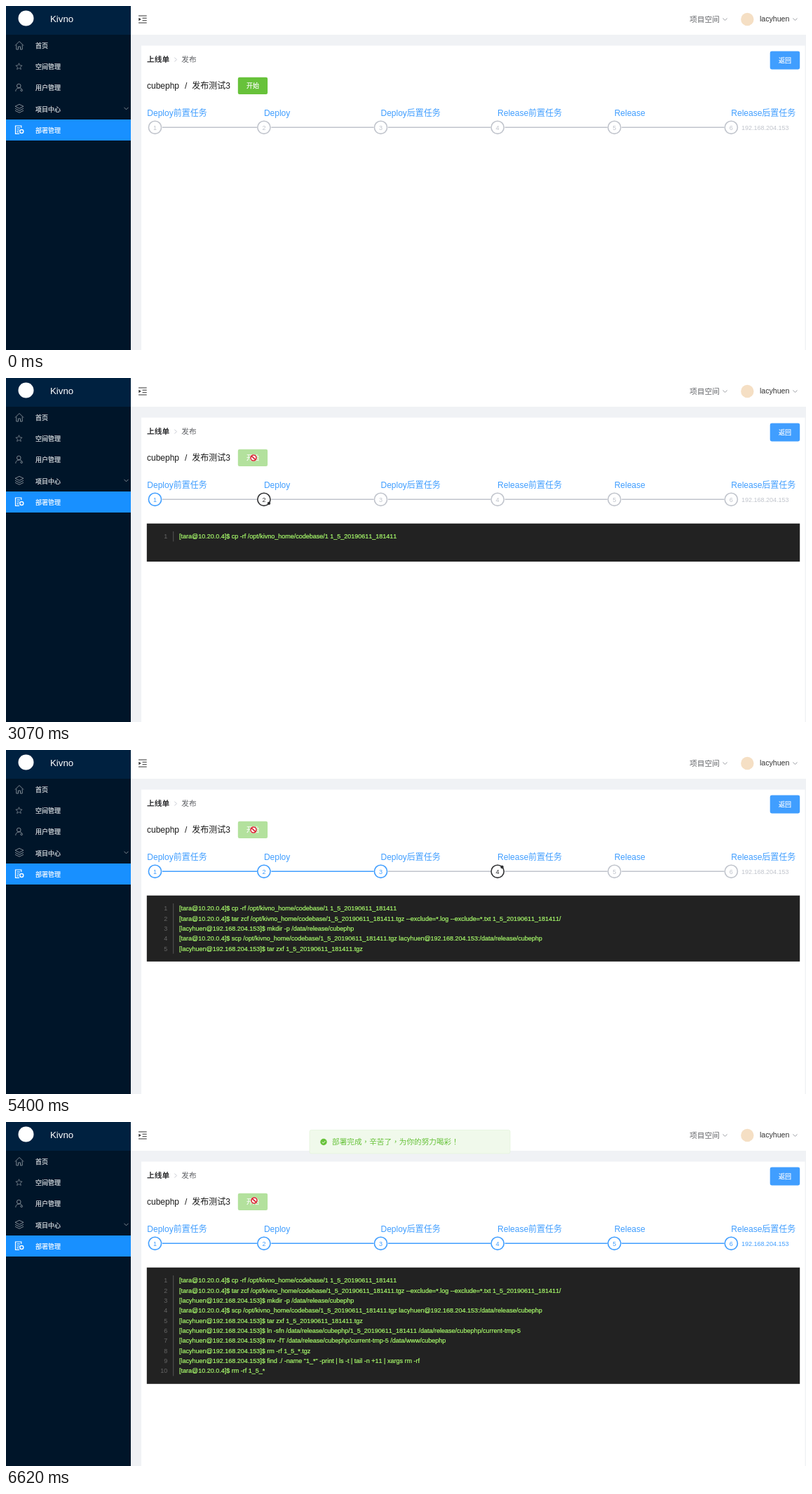
Animation, 1141 px wide and 491 px high, one loop 6.69 s. Source, as an HTML page:

```html
<!DOCTYPE html>
<html lang="zh-CN">
<head>
<meta charset="utf-8">
<title>部署</title>
<style>
html, body { margin: 0; width: 100%; height: 100%; overflow: hidden; background: #f0f2f5; }
svg { display: block; width: 1141px; height: 491px; }
text { font-family: "Liberation Sans", "Noto Sans CJK SC", "Noto Sans CJK", sans-serif; font-kerning: none; white-space: pre; }
.wide { font-family: "Noto Sans CJK TC", "Noto Sans CJK", sans-serif; }
</style>
</head>
<body>
<svg id="stage" viewBox="0 0 1141 491"></svg>
<script>
const LOOP = 6690, TICK = 77;
const BLUE = '#409eff', GRAY = '#c0c4cc', DARK = '#303133', GREEN = '#67c23a', LIME = '#aaff6c';
const USER = 'lacyhuen', HOST = '192.168.204.153';
const LOCAL = '[tara@10.20.0.4]$ ', REMOTE = `[${USER}@${HOST}]$ `;
const HOME = '/opt/kivno_home/codebase/1', BUILD = '1_5_20190611_181411';
const LINE = 14.35;

const commands = [
  `${LOCAL}cp -rf ${HOME} ${BUILD}`,
  `${LOCAL}tar zcf /opt/kivno_home/codebase/${BUILD}.tgz --exclude=*.log --exclude=*.txt ${BUILD}/`,
  `${REMOTE}mkdir -p /data/release/cubephp`,
  `${LOCAL}scp /opt/kivno_home/codebase/${BUILD}.tgz ${USER}@${HOST}:/data/release/cubephp`,
  `${REMOTE}tar zxf ${BUILD}.tgz`,
  `${REMOTE}ln -sfn /data/release/cubephp/${BUILD} /data/release/cubephp/current-tmp-5`,
  `${REMOTE}mv -fT /data/release/cubephp/current-tmp-5 /data/www/cubephp`,
  `${REMOTE}rm -rf 1_5_*.tgz`,
  `${REMOTE}find ./ -name "1_*" -print | ls -t | tail -n +11 | xargs rm -rf`,
  `${LOCAL}rm -rf 1_5_*`
];
const steps = ['Deploy前置任务', 'Deploy', 'Deploy后置任务', 'Release前置任务', 'Release', 'Release后置任务'];

// time, active step, visible lines
const progress = [
  [0, -1, 0], [3070, 1, 1], [3780, 2, 2], [5090, 3, 3], [5170, 3, 4],
  [5400, 3, 5], [5470, 4, 7], [5550, 5, 8], [5630, 5, 9], [5700, 6, 10]
];

const rect = (x, y, w, h, fill, more = '') =>
  `<rect x="${x}" y="${y}" width="${w}" height="${h}" fill="${fill}" ${more}/>`;
const circle = (x, y, r, more) => `<circle cx="${x}" cy="${y}" r="${r}" ${more}/>`;
const path = (d, color, width = 1, more = '') =>
  `<path d="${d}" fill="none" stroke="${color}" stroke-width="${width}" ${more}/>`;
const label = (x, y, size, fill, str, more = '') =>
  `<text x="${x}" y="${y}" font-size="${size}" fill="${fill}" ${more}>${str}</text>`;
const chevron = (x, y, color) => path(`M${x - 3} ${y - 1.5}l3 3l3 -3`, color, 0.9);
const heavier = color => `stroke="${color}" stroke-width=".2"`;
const mid = 'text-anchor="middle"';

function starPath(x, y, r) {
  let d = '';
  for (let i = 0; i < 10; i++) {
    const a = -Math.PI / 2 + i * Math.PI / 5, q = i % 2 ? r * 0.45 : r;
    d += `${i ? 'L' : 'M'}${(x + q * Math.cos(a)).toFixed(2)} ${(y + q * Math.sin(a)).toFixed(2)}`;
  }
  return d + 'Z';
}

function sidebar() {
  const ink = '#8e979f';
  const names = ['首页', '空间管理', '用户管理', '项目中心', '部署管理'];
  return rect(0, 0, 178, 491, '#001529') + rect(0, 0, 178, 41, '#002140') +
    rect(0, 162, 178, 30, '#1890ff') +
    circle(28.5, 17.5, 11, 'fill="#fff"') +
    label(63, 23.2, 13.3, '#fff', 'Kivno') +
    names.map((s, i) => {
      const color = i === 4 ? '#fff' : '#e4e7ea';
      return label(42, 60.2 + i * 30.1, 9, color, s, heavier(color));
    }).join('') +
    path('M13 56.5L19 50.5L25 56.5M14.8 55.5V62H17.5V58H20.5V62H23.2V55.5', ink, 0.9) +
    path(starPath(18.5, 86.5, 4.8), ink, 0.7) +
    path('M13.8 121.8C13.8 116 22 116 22.5 118.5', ink, 0.9) +
    circle(18.3, 114, 2.8, `fill="none" stroke="${ink}" stroke-width=".9"`) +
    circle(22.2, 120.3, 1.3, `fill="none" stroke="${ink}" stroke-width=".9"`) +
    path('M13 143.3L19 140.3L25 143.3L19 146.3ZM13 146.3L19 149.3L25 146.3M13 149.2L19 152.2L25 149.2', ink, 0.9) +
    chevron(171.5, 146.3, ink) +
    path('M21.8 174V171H13.5V182.3H19M15.5 174H20M15.5 177H19M15.5 179.7H18', '#fff', 1.2) +
    circle(22.3, 179, 2.5, 'fill="none" stroke="#fff" stroke-width="1.4"');
}

function header() {
  return rect(178, 0, 963, 41, '#fff') +
    path('M189 14H200.7M194.5 17.3H200.7M194.5 20.7H200.7M189 24H200.7', '#333') +
    '<path d="M189.3 16.7L192.8 19L189.3 21.3Z" fill="#333"/>' +
    label(975, 22.7, 10.7, '#606266', '项目空间') + chevron(1025.5, 19, '#909399') +
    circle(1057.3, 19, 9.2, 'fill="#f5dfc4"') +
    label(1075, 22.4, 10.6, '#333', USER) + chevron(1125.5, 19, '#909399');
}

function content() {
  return rect(193, 56.5, 946.5, 434.5, '#fff') +
    label(201, 80.4, 10.7, DARK, '上线单', 'font-weight="700"') +
    path('M240.3 73.5L243.3 76.5L240.3 79.5', GRAY, 0.9) +
    label(250.3, 80.4, 10.7, '#606266', '发布') +
    rect(1089.7, 64.6, 42.5, 25.8, BLUE, 'rx="2.4"') +
    label(1111, 80.8, 9, '#fff', '返回', mid + ' ' + heavier('#fff')) +
    label(201, 117.6, 12, '#1a1a1a', 'cubephp') + label(255, 117.6, 12, '#1a1a1a', '/') +
    label(265.3, 117.6, 12, '#1a1a1a', '发布测试3') +
    rect(330.8, 101.8, 42.3, 24.2, GREEN, 'rx="2.2" id="start"') +
    label(352, 117.2, 9, '#fff', '开始', mid + ' ' + heavier('#fff'));
}

const titleX = i => 201.3 + i * 166.6;
const stepX = i => i ? titleX(i) : 212.5;
const STEP_Y = 173.3;

function stepBar() {
  return steps.map((s, i) => {
    const x = stepX(i);
    const link = i < 5 ? path(`M${x + 10.5} ${STEP_Y}H${stepX(i + 1) - 10}`, GRAY, 1.6, `id="link${i}"`) : '';
    return label(titleX(i), 156.7, 12, BLUE, s) + link +
      circle(x, STEP_Y, 9.1, `fill="#fff" stroke="${GRAY}" stroke-width="1.6" id="ring${i}"`) +
      label(x, STEP_Y + 3.3, 9, GRAY, i + 1, `${mid} id="num${i}"`);
  }).join('') +
    label(1049, 176.6, 9, GRAY, HOST, 'id="host"') +
    circle(0, 0, 2.2, `fill="${DARK}" id="dot"`);
}

function terminal() {
  return '<g id="term">' + rect(200.8, 207.7, 931.4, 54.4, '#222', 'id="box"') +
    path('', '#5c5c5c', 0.9, 'id="gutter"') +
    commands.map((s, i) => {
      const y = 229.3 + i * LINE;
      return `<g id="row${i}">` + label(230.3, y, 9, '#666', i + 1, 'text-anchor="end"') +
        label(247, y, 9, LIME, s, heavier(LIME)) + '</g>';
    }).join('') + '</g>';
}

function toast() {
  return '<g id="toast">' + rect(433, 11.5, 286, 33.5, '#f0f9eb', 'rx="2.4" stroke="#e1f3d8" stroke-width=".7"') +
    circle(453, 28.5, 4.7, `fill="${GREEN}"`) + path('M450.8 28.5L452.5 30.2L455.3 27.2', '#fff') +
    label(465, 32.3, 10.65, GREEN, '部署完成，辛苦了，为你的努力喝彩！', 'class="wide" lang="zh-TW"') + '</g>';
}

// each cursor has its hot spot at 0,0
function cursors() {
  const outline = 'fill="#fff" stroke="#000" stroke-width=".7" stroke-linejoin="round"';
  return `<g id="arrow"><path d="M0 0V11L2.5 8.7L4.2 12.3L5.8 11.6L4.2 8.1H7.6Z" ${outline}/></g>` +
    `<g id="hand"><path d="M-1 .8Q0 -.4 1 .8V5L3.3 5.2L5.5 6Q7 6.3 7 7.5V10.5L5.8 14H-.3L-3 9.3Q-3.4 7.5 -1 8.6Z" ${outline}/></g>` +
    '<g id="stop">' + circle(0, 0, 5.1, 'fill="#fff"') +
    circle(0, 0, 4, 'fill="none" stroke="#d8232f" stroke-width="1.6"') +
    path('M-2.9 -2.7L2.9 2.7', '#d8232f', 1.8) + '</g>';
}

document.getElementById('stage').innerHTML =
  rect(0, 0, 1141, 491, '#f0f2f5') + sidebar() + header() + content() + stepBar() + terminal() + toast() + cursors();

const el = {};
document.querySelectorAll('#stage [id]').forEach(e => { el[e.id] = e; });
const set = (id, name, value) => el[id].setAttribute(name, value);
const show = (id, on) => set(id, 'visibility', on ? 'visible' : 'hidden');
const snap = (t, start) => start + Math.floor((t - start) / TICK) * TICK;
const clamp = v => Math.max(0, Math.min(1, v));

function drawSteps(t) {
  const [, active, lines] = progress.filter(p => p[0] <= t).pop();
  steps.forEach((s, i) => {
    const color = i < active ? BLUE : i === active ? DARK : GRAY;
    set('ring' + i, 'stroke', color);
    set('num' + i, 'fill', color);
    if (i < 5) set('link' + i, 'stroke', i < active - 1 ? BLUE : GRAY);
    else set('host', 'fill', color);
  });

  const spinning = active > 0 && active < 6;
  show('dot', spinning);
  if (spinning) {
    const a = (38 + (snap(t, 3070) - 3070) * 0.12) * Math.PI / 180;
    set('dot', 'cx', stepX(active) + 9 * Math.cos(a));
    set('dot', 'cy', STEP_Y + 9 * Math.sin(a));
  }

  set('term', 'display', t >= 1380 ? 'inline' : 'none');
  set('box', 'height', Math.max(54.4, 22.3 + 14.38 * lines));
  set('gutter', 'd', lines ? `M238.7 219V${219 + LINE * lines}` : '');
  commands.forEach((s, i) => show('row' + i, i < lines));
}

function drawCursor(t) {
  let x = 353, y = 114;
  const k = clamp((snap(t, 70) - 70) / (8 * TICK - 5));
  if (t < 680) {
    const e = k * k * (3 - 2 * k);
    x = 954 + (353 - 954) * e;
    y = 458 + (114 - 458) * e;
  } else if (t >= 6550) {
    x = t < 6620 ? 353.5 : 354;
    y = t < 6620 ? 113 : 112;
  }
  const over = t >= 70 && x < 373 && y < 126;
  const kind = t < 70 ? '' : t >= 1310 ? 'stop' : over ? 'hand' : 'arrow';
  for (const id of ['arrow', 'hand', 'stop']) {
    show(id, id === kind);
    set(id, 'transform', `translate(${x} ${y})`);
  }
  set('start', 'fill', t >= 1380 ? '#b3e19d' : t >= 1210 ? '#5daf34' : over ? '#85ce61' : GREEN);
}

function drawToast(t) {
  show('toast', t >= 5860);
  const p = clamp((snap(t, 5860) - 5810) / 320), e = 1 - (1 - p) ** 2.5;
  set('toast', 'opacity', e);
  set('toast', 'transform', `translate(0 ${-34 * (1 - e)})`);
}

function draw(t) {
  drawSteps(t);
  drawCursor(t);
  drawToast(t);
}

const began = performance.now();
function loop() {
  draw((performance.now() - began) % LOOP);
  requestAnimationFrame(loop);
}
loop();
</script>
</body>
</html>
```
